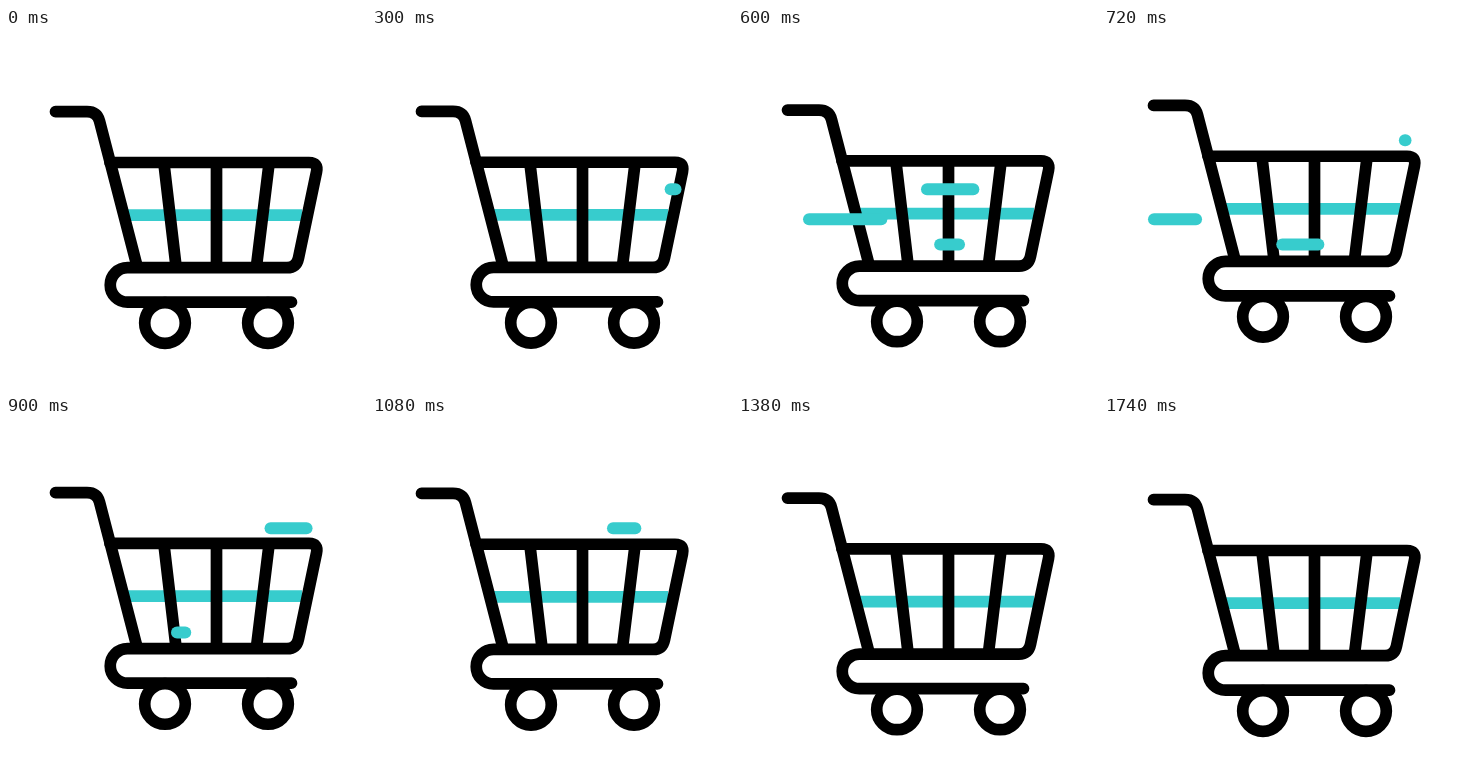
An HTML page for the animation above (1.8 s loop, 360 by 360 pixels).

```html
<!DOCTYPE html>
<html lang="en">
<head>
<meta charset="utf-8">
<title>Shopping cart</title>
<style>
  html, body { margin: 0; width: 100%; height: 100%; overflow: hidden; background: #fff; }
  svg { display: block; width: 100%; height: 100%; fill: none; stroke-linecap: round; stroke-linejoin: round; }
</style>
</head>
<body>
<svg viewBox="0 0 360 360">
  <g id="cart" stroke="#000" stroke-width="11.700">
    <path d="M122 187.200H296" stroke="#37cccd" stroke-linecap="butt"/>
    <path d="M158 136L170 238M210.500 136V238M263 136L250.500 238"/>
    <path d="M49.500 83.700H81Q91 83.700 93.500 93L130.500 236"/>
    <path d="M104 134.500H303Q312.500 134.500 310.500 144L292.500 230Q290.500 239.700 281 239.700H121.500A17.250 17.250 0 0 0 121.500 274.200H285.500"/>
    <circle cx="159" cy="295" r="20.300"/>
    <circle cx="262" cy="295" r="20.300"/>
  </g>
  <g id="streaks" stroke="#37cccd" stroke-width="12"></g>
</svg>
<script>
const LOOP = 1800, LIFT = 12;
const landings = [0, 290, 635, 995, 1355, 1620];
const streaks = [
  { y: 161.2, from: 303.5, to: 189, start: 270, lag: 190, sweep: 250 },
  { y: 191.2, from: 158, to: 50, start: 350, lag: 170, sweep: 350 },
  { y: 216.5, from: 221, to: 171, start: 455, lag: 186, sweep: 350 },
  { y: 112.2, from: 301.5, to: 241, start: 700, lag: 175, sweep: 350 }
];

const cart = document.getElementById('cart');
const layer = document.getElementById('streaks');
for (const s of streaks) {
  s.el = layer.appendChild(document.createElementNS('http://www.w3.org/2000/svg', 'path'));
}

const ease = u => {
  u = Math.min(1, Math.max(0, u));
  return u * u * (3 - 2 * u);
};

// Height of the hop between two neighbouring landings.
function hop(t) {
  const i = landings.findIndex(end => t < end);
  if (i < 1) return 0;
  const a = landings[i - 1], b = landings[i];
  return LIFT * Math.sin(Math.PI * (t - a) / (b - a)) ** 1.7;
}

function drawStreak(s, t) {
  const at = begin => s.from + (s.to - s.from) * ease((t - begin) / s.sweep);
  const tailStart = s.start + s.lag;
  const visible = t > s.start && t < tailStart + s.sweep;
  s.el.setAttribute('visibility', visible ? 'visible' : 'hidden');
  s.el.setAttribute('d', `M${at(tailStart) + 0.01} ${s.y}H${at(s.start)}`);
}

function render(t) {
  cart.setAttribute('transform', `translate(0 ${-hop(t)})`);
  streaks.forEach(s => drawStreak(s, t));
}

const origin = performance.now();
function tick() {
  render((performance.now() - origin) % LOOP);
  requestAnimationFrame(tick);
}
tick();
</script>
</body>
</html>
```
